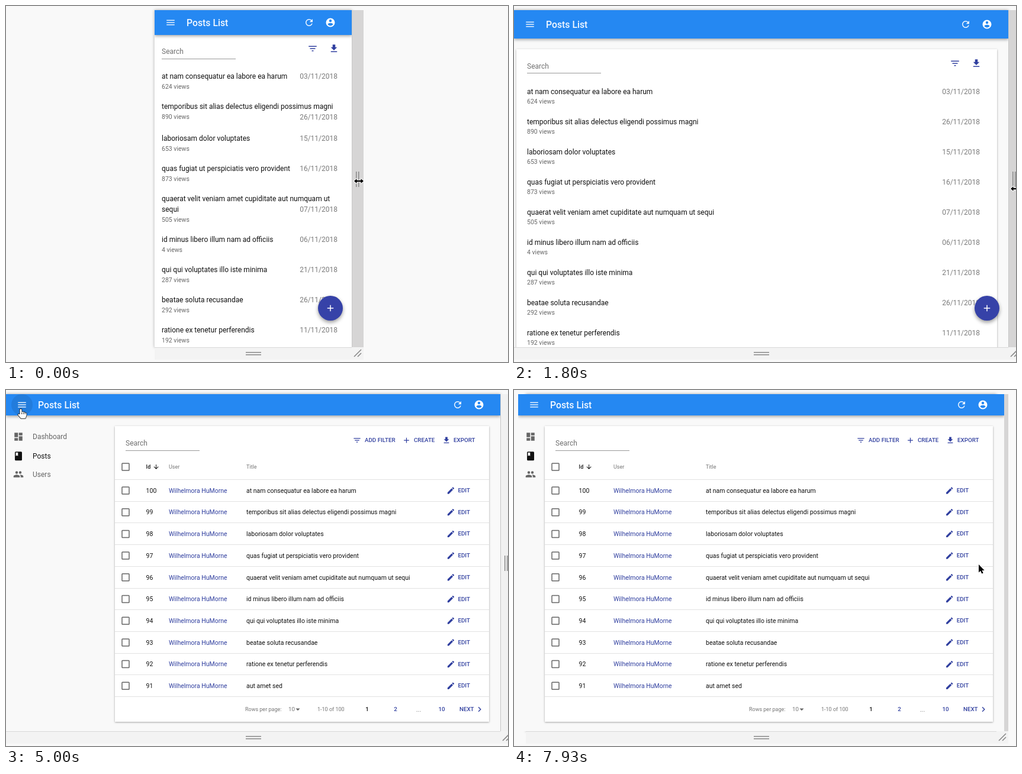
These frames come from a looping animation (848 px wide and 602 px high, 8 s). An HTML page with a canvas:

```html
<!DOCTYPE html>
<html lang="en">
<head>
<meta charset="utf-8">
<title>Responsive posts list</title>
<style>
html, body { margin: 0; width: 100%; height: 100%; overflow: hidden; background: #f9f9f9; }
canvas { display: block; width: 848px; height: 602px; }
</style>
</head>
<body>
<canvas id="stage"></canvas>
<script>
const canvas = document.getElementById('stage'), ctx = canvas.getContext('2d');
const dpr = window.devicePixelRatio || 1;
canvas.width = 848 * dpr;
canvas.height = 602 * dpr;

const LOOP = 8000, TICK = 1000 / 15, MID = 417.5, TOP = 7, BOTTOM = 577;
const BLUE = '#2588f2', INDIGO = '#303f9f', GREY = '#757575', INK = '#111';
const USER = 'Wilhelmora HuMorne';
const POSTS = [
  ['at nam consequatur ea labore ea harum', 624, '03'],
  ['temporibus sit alias delectus eligendi possimus magni', 890, '26'],
  ['laboriosam dolor voluptates', 653, '15'],
  ['quas fugiat ut perspiciatis vero provident', 873, '16'],
  ['quaerat velit veniam amet cupiditate aut numquam ut sequi', 505, '07'],
  ['id minus libero illum nam ad officiis', 4, '06'],
  ['qui qui voluptates illo iste minima', 287, '21'],
  ['beatae soluta recusandae', 292, '26'],
  ['ratione ex tenetur perferendis', 192, '11'],
  ['aut amet sed']
];

// Icons on a 24 unit grid
const ICONS = {
  menu: 'M3 18h18v-2H3zm0-5h18v-2H3zm0-7v2h18V6z',
  refresh: 'M17.65 6.35A8 8 0 1 0 19.73 14h-2.08A6 6 0 1 1 16.22 7.78L13 11h7V4z',
  account: 'M12 2a10 10 0 1 0 0 20 10 10 0 0 0 0-20zm0 3a3 3 0 1 1 0 6 3 3 0 0 1 0-6zm0 14.2c-2.5 0-4.7-1.3-6-3.2 0-2 4-3.1 6-3.1s6 1.1 6 3.1c-1.3 1.9-3.5 3.2-6 3.2z',
  filter: 'M10 18h4v-2h-4zM3 6v2h18V6zm3 7h12v-2H6z',
  save: 'M19 9h-4V3H9v6H5l7 7zM5 18v2h14v-2z',
  add: 'M19 13h-6v6h-2v-6H5v-2h6V5h2v6h6z',
  edit: 'M3 17.25V21h3.75L17.8 9.94l-3.75-3.75zM20.7 7.04a1 1 0 0 0 0-1.41L18.37 3.3a1 1 0 0 0-1.41 0l-1.83 1.83 3.75 3.75z',
  down: 'M20 12l-1.4-1.4L13 16.2V4h-2v12.2l-5.6-5.6L4 12l8 8z',
  next: 'M10 6L8.6 7.4l4.6 4.6-4.6 4.6L10 18l6-6z',
  drop: 'M7 10l5 5 5-5z',
  box: 'M19 5v14H5V5zm0-2H5a2 2 0 0 0-2 2v14c0 1.1.9 2 2 2h14a2 2 0 0 0 2-2V5a2 2 0 0 0-2-2z',
  dashboard: 'M3 13h8V3H3zm0 8h8v-6H3zm10 0h8V11h-8zm0-18v6h8V3z',
  book: 'M18 2H6a2 2 0 0 0-2 2v16c0 1.1.9 2 2 2h12a2 2 0 0 0 2-2V4a2 2 0 0 0-2-2zM6 4h5v8l-2.5-1.5L6 12z',
  people: 'M16 11a3 3 0 1 0 0-6 3 3 0 0 0 0 6zm-8 0a3 3 0 1 0 0-6 3 3 0 0 0 0 6zm0 2c-2.3 0-7 1.2-7 3.5V19h14v-2.5C15 14.2 10.3 13 8 13zm8 0h-1c1.2.9 2 2 2 3.5V19h6v-2.5c0-2.3-4.7-3.5-7-3.5z'
};
const CURSORS = {
  arrow: 'M0 0V13.5L3.1 10.8L5.3 15.6L7.6 14.6L5.5 9.9H9.6Z',
  resize: 'M-8 0L-3.5-4V-1.2H3.5V-4L8 0L3.5 4V1.2H-3.5V4Z',
  hand: 'M-1.5 1Q0-1 1.5 1V5.5Q3-.3 4.3 4.5V6Q5.8 4 7 6Q9.6 5 9.6 8V11L7.5 16H0L-4.8 9.5Q-5-.5 -1.5 9Z'
};
CURSORS.hand = 'M-1.5 1Q0-1 1.5 1V5.5Q3 4.2 4.3 5.6Q5.8 4.8 7 6.4Q9.6 6 9.6 8.4V11L7.8 16H.2L-4.8 10Q-4.8 7.6-1.5 9Z';
for (const set of [ICONS, CURSORS]) for (const k in set) set[k] = new Path2D(set[k]);

// Smooth monotone curve through [time, value] points
function track(points) {
  const slope = i => (points[i + 1][1] - points[i][1]) / (points[i + 1][0] - points[i][0]);
  const last = points.length - 1;
  const tangents = points.map((_, i) => {
    if (i === 0 || i === last) return slope(i ? i - 1 : 0);
    const a = slope(i - 1), b = slope(i);
    return a * b > 0 ? 2 * a * b / (a + b) : 0;
  });
  return t => {
    if (t >= points[last][0]) return points[last][1];
    let i = 0;
    while (t >= points[i + 1][0]) i++;
    const [t0, a] = points[i], [t1, b] = points[i + 1], d = t1 - t0, u = (t - t0) / d, v = 1 - u;
    return v * v * (1 + 2 * u) * a + u * u * (3 - 2 * u) * b
      + u * v * d * (v * tangents[i] - u * tangents[i + 1]);
  };
}
const frameHalf = track([[0, 166.5], [67, 166.5], [667, 288.5], [867, 345], [1200, 393.5], [1600, 416], [1800, 417.5], [7667, 417.5], [7933, 397.5]]);
const appHalf = track([[0, 166.5], [150, 166.5], [667, 243.5], [867, 306], [1200, 390.5], [1600, 414], [1800, 417.5], [7733, 417.5], [7933, 410.5]]);
const pointerX = track([[0, 596], [67, 596], [667, 762], [867, 794], [1200, 830], [1800, 847], [2200, 849], [3200, 25], [5200, 25], [5867, 451], [6400, 770], [6700, 830], [7000, 844], [7667, 844], [7933, 785]]);
const pointerY = track([[0, 296], [67, 296], [667, 314], [1200, 310], [1800, 309], [2200, 309], [3200, 32], [5200, 32], [5867, 182], [6400, 280], [6700, 298], [7000, 300], [7667, 300], [7933, 295]]);
const ease = u => { u = Math.min(1, Math.max(0, u)); return u * u * (3 - 2 * u); };

function rect(x, y, w, h, color, blur = 0, dy = 0) {
  ctx.save();
  if (blur) {
    ctx.shadowColor = 'rgba(0,0,0,.35)';
    ctx.shadowBlur = blur * dpr;
    ctx.shadowOffsetY = dy * dpr;
  }
  ctx.fillStyle = color;
  ctx.fillRect(x, y, w, h);
  ctx.restore();
}
function disc(x, y, r, color, blur = 0) {
  ctx.save();
  ctx.shadowColor = 'rgba(0,0,0,.4)';
  ctx.shadowBlur = blur * dpr;
  ctx.shadowOffsetY = blur / 2 * dpr;
  ctx.fillStyle = color;
  ctx.beginPath();
  ctx.arc(x, y, r, 0, 7);
  ctx.fill();
  ctx.restore();
}
function setFont(size, weight = 400) { ctx.font = `${weight} ${size}px Roboto, sans-serif`; }
function text(s, x, y, size, color, weight, align = 'left') {
  setFont(size, weight);
  ctx.textAlign = align;
  ctx.fillStyle = color;
  ctx.fillText(s, x, y + size * 0.355);
}
function icon(name, x, y, size, color) {
  ctx.save();
  ctx.translate(x - size / 2, y - size / 2);
  ctx.scale(size / 24, size / 24);
  ctx.fillStyle = color;
  ctx.fill(ICONS[name], 'evenodd');
  ctx.restore();
}
function line(x1, y1, x2, y2, color, width) {
  ctx.strokeStyle = color;
  ctx.lineWidth = width;
  ctx.beginPath();
  ctx.moveTo(x1, y1);
  ctx.lineTo(x2, y2);
  ctx.stroke();
}
function search(x, y, gap) {
  text('Search', x, y, 12, '#707070');
  rect(x, y + gap, 125, 1, '#999');
}

function drawFrame(half, hot) {
  const x = MID - half, right = MID + half;
  rect(x, TOP, half * 2, BOTTOM - TOP, '#fff', 5);
  rect(x, BOTTOM + 1, half * 2 + 20, 20, '#f3f3f3');
  rect(right, TOP, 20, BOTTOM - TOP, hot ? '#d6d5d5' : '#f1f1f1');
  rect(right, BOTTOM, 20, 21, '#f3f3f3');
  rect(x, BOTTOM, half * 2, 1, '#d8d8d8');
  rect(x - 1, TOP, 1, BOTTOM - TOP, '#dedede');
  rect(right, TOP, 1, BOTTOM - TOP, '#c8c8c8');
  for (const d of [0, 4]) {
    rect(right + 7 + d, 280, 1.5, 26, '#888');
    rect(405, 585 + d, 26, 1.5, '#888');
  }
  line(right + 4, 593, right + 16, 581, '#888', 1.6);
  line(right + 10, 593, right + 16, 587, '#888', 1.6);
}

function drawBar(x, right, height, hover) {
  const y = TOP + height / 2;
  rect(x, TOP, right - x, height, BLUE, 5, 2);
  if (hover) disc(x + 27, y, 18, 'rgba(0,0,0,.09)');
  icon('menu', x + 27, y, 18, '#e4f0fd');
  text('Posts List', x + 54, y, 15.75, '#f4f9ff', 500);
  icon('refresh', right - 72, y, 18, '#f0f7ff');
  icon('account', right - 36, y, 18, '#fff');
}

function drawMobile(x, right) {
  const w = right - x, size = w < 450 ? 0 : w < 720 ? 1 : 2;
  const pad = [12, 18, 22][size], dateX = right - [24, 30, 48][size];
  const searchY = [77, 84, 102][size], iconY = [72, 79, 97][size], iconX = right - [30, 36, 54][size];
  rect(x, TOP, w, BOTTOM - TOP, size === 2 ? '#f9f9f9' : '#fff');
  if (size === 2) rect(x + 4, 73, w - 23, 520, '#fff', 3, 1);
  if (size === 1) rect(right - 1, TOP, 1, BOTTOM - TOP, '#ececec');
  search(x + pad, searchY, 12 - (size > 0));
  icon('filter', iconX - 36, iconY, 18, INDIGO);
  icon('save', iconX, iconY, 18, INDIGO);

  let y = searchY + (size ? 43 : 42);
  const left = x + pad, room = dateX - left;
  for (const [title, views, day] of POSTS.slice(0, 9)) {
    setFont(12);
    const width = ctx.measureText(title).width;
    const wraps = width > room, dropDate = width + 66 > room;
    const cut = title.lastIndexOf(' ');
    text(wraps ? title.slice(0, cut) : title, left, y, 12, INK);
    if (wraps) text(title.slice(cut + 1), left, y + 18, 12, INK);
    text(day + '/11/2018', dateX, y + (dropDate ? 18 : 0), 12, '#7a7a7a', 400, 'right');
    text(views + ' views', left, y + (wraps ? 35 : size ? 16 : 17), 10.5, '#666');
    y += wraps ? 69 : dropDate ? 54 : 51;
  }
  drawBar(x, right, size ? 48 : 42, false);
  disc(right - 36, 511, 21, '#3642a8', 6);
  icon('add', right - 36, 511, 18, '#fff');
}

function drawSidebar(x, width) {
  ctx.save();
  ctx.beginPath();
  ctx.rect(x, TOP, width, BOTTOM - TOP);
  ctx.clip();
  [['dashboard', 'Dashboard'], ['book', 'Posts'], ['people', 'Users']].forEach(([name, label], i) => {
    const y = 79 + i * 31.7 + (i === 1 ? 1 : 0), color = i === 1 ? INK : '#666';
    icon(name, x + 21, y, 18, color);
    text(label, x + 45, y, 12, color);
  });
  ctx.restore();
}

function drawDesktop(x, appRight, open, hover) {
  const left = x + 45 + 139 * open, right = appRight - 19, delta = right - left - 767;
  const idX = left + 58 + delta * 0.04, userX = left + 118 + delta * 0.2, titleX = left + 276 + delta * 0.4;
  const editX = right - 62 - delta * 0.07;
  const button = (label, dx) => text(label, right - dx, 84.5, 9.75, INDIGO, 500);
  rect(x, TOP, appRight - x, BOTTOM - TOP, '#f9f9f9');
  drawSidebar(x, left - x);
  rect(left, 61, right - left, 500, '#fff', 3, 1);
  search(left + 18, 90, 12);
  icon('filter', right - 223, 85, 15, INDIGO);
  button('ADD FILTER', 210);
  icon('add', right - 139.5, 85, 15, INDIGO);
  button('CREATE', 127);
  icon('save', right - 72, 85, 15, INDIGO);
  button('EXPORT', 60);

  icon('box', left + 18, 130, 18, '#666');
  text('Id', idX, 130, 9, INK, 500);
  icon('down', idX + 17, 130, 12, INK);
  text('User', userX, 130, 9, GREY);
  text('Title', titleX, 130, 9, GREY);
  POSTS.forEach(([title], i) => {
    const y = 170 + i * 36.7;
    rect(left, Math.round(y - 19), right - left, 1, '#e2e2e2');
    icon('box', left + 18, y, 18, '#666');
    text(100 - i, idX, y, 10.5, INK);
    text(USER, userX, y, 10.5, INDIGO);
    text(title, titleX, y, 10.5, INK);
    icon('edit', editX - 12, y, 15, INDIGO);
    text('EDIT', editX, y - 0.4, 9.75, INDIGO, 500);
  });
  rect(left, 518, right - left, 1, '#e2e2e2');

  const pager = (s, dx, color, weight, size = 9.75) => text(s, right - dx, 540, size, color, weight, 'center');
  text('Rows per page:', right - 412, 540, 9, GREY);
  text('10', right - 339, 540, 9.75, GREY);
  icon('drop', right - 323, 540, 17, '#666');
  text('1-10 of 100', right - 290, 540, 9, GREY);
  pager('1', 206, INK, 500);
  pager('2', 158, INDIGO, 500);
  pager('...', 119, GREY, 400, 10.5);
  pager('10', 80, INDIGO, 500);
  text('NEXT', right - 50, 540, 9.75, INDIGO, 500);
  icon('next', right - 16, 540, 17, INDIGO);
  drawBar(x, appRight, 36, hover);
}

function drawPointer(kind, x, y) {
  ctx.save();
  ctx.translate(x, y);
  const hand = kind === 'hand';
  ctx.lineJoin = 'round';
  ctx.lineWidth = hand ? 1.4 : 2;
  ctx.fillStyle = hand ? '#fff' : '#000';
  ctx.strokeStyle = hand ? '#000' : '#fff';
  ctx.stroke(CURSORS[kind]);
  ctx.fill(CURSORS[kind]);
  if (hand) for (const fx of [1.5, 4.3, 7]) line(fx, 6, fx, 9, '#000', 0.8);
  ctx.restore();
}

function draw(now) {
  const t = Math.floor((now % LOOP + 4) / TICK) * TICK;
  const px = pointerX(t), py = pointerY(t), half = appHalf(t);
  const x = MID - half, right = MID + half;
  const onEdge = t < 2000 || px >= 835, onMenu = Math.hypot(px - 27, py - 25) < 19;
  const open = ease((t - 3580) / 200) - ease((t - 5000) / 200);

  ctx.setTransform(dpr, 0, 0, dpr, 0, 0);
  rect(0, 0, 848, 602, '#f9f9f9');
  drawFrame(frameHalf(t), onEdge || t > 7690);
  ctx.save();
  ctx.beginPath();
  ctx.rect(x, TOP, right - x, BOTTOM - TOP);
  ctx.clip();
  if (t < 1990) drawMobile(x, right);
  else drawDesktop(x, right, open, onMenu);
  ctx.restore();
  drawPointer(onEdge ? 'resize' : onMenu ? 'hand' : 'arrow', px, py);
}

const start = performance.now();
function loop() {
  draw(performance.now() - start);
  requestAnimationFrame(loop);
}
loop();
</script>
</body>
</html>
```
